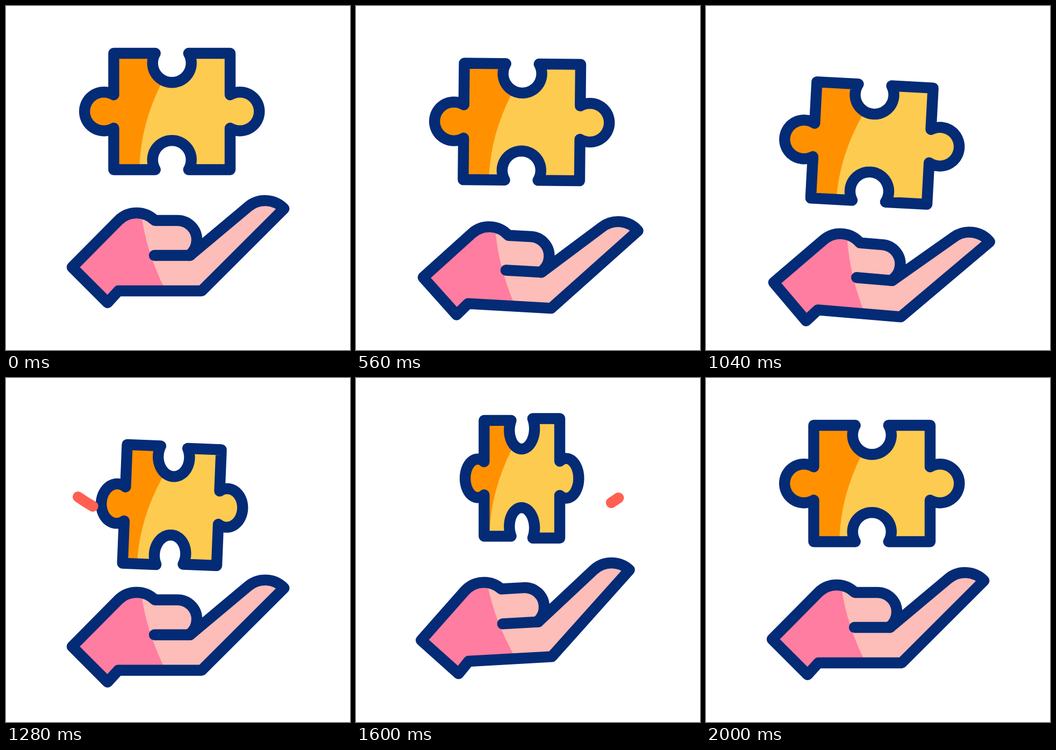
Write an HTML page with a canvas that moves like this. It is 640 by 640 pixels and loops after 2240 ms.

```html
<!DOCTYPE html>
<html lang="en">
<head>
<meta charset="utf-8">
<title>Puzzle in hand</title>
<style>
  html, body { margin: 0; width: 100%; height: 100%; overflow: hidden; background: #fff; }
  canvas { display: block; width: 100vw; height: 100vh; }
</style>
</head>
<body>
<canvas id="stage"></canvas>
<script>
const SIZE = 640, LOOP = 2240, STEP = 40;
const NAVY = '#042b76', ORANGE = '#ff9100', YELLOW = '#fdcb50';
const PINK = '#ff7da0', SKIN = '#fdbdb8', RED = '#ff6052';
const RAD = Math.PI / 180;

const canvas = document.getElementById('stage');
const ctx = canvas.getContext('2d');
const ratio = window.devicePixelRatio || 1;
canvas.width = canvas.height = SIZE * ratio;

const clamp = (x, lo, hi) => Math.min(hi, Math.max(lo, x));

// Cubic ease with horizontal handles of length u (start) and 1 - v (end).
function ease(p, u = 1 / 3, v = 2 / 3) {
  let lo = 0, hi = 1;
  for (let i = 0; i < 24; i++) {
    const s = (lo + hi) / 2, r = 1 - s;
    if (3 * r * r * s * u + 3 * r * s * s * v + s * s * s < p) lo = s; else hi = s;
  }
  return lo * lo * (3 - 2 * lo);
}

// Each segment: start time, end time, end value, handles.
function track(t, segments) {
  let value = 0;
  for (const [from, to, end, u, v] of segments) {
    if (t <= from) break;
    value += (end - value) * ease(clamp((t - from) / (to - from), 0, 1), u, v);
  }
  return value;
}

const DROP = [0.59, 0.25], RISE = [0.58, 0.56];
const motion = {
  handY: [[240, 880, 31.3, ...DROP], [1000, 1480, 0, ...RISE]],
  handTurn: [[240, 880, 4.85, ...DROP], [1000, 1480, -3.7, ...RISE], [1480, 2000, 0]],
  pieceY: [[320, 960, 58.8, 0.6, 0.2], [1080, 1560, -9.8, 0.6, 0.53], [1560, 2000, 0]],
  pieceTurn: [[360, 1000, 3.05, 0.6, 0.2], [1080, 1560, 0, 0.6, 0.53]],
  spin: [[1080, 2000, 180, 0.235, 0.516]],
  head: [[1240, 1460, 1]],
  tail: [[1320, 1640, 1]]
};

// Piece outline around its own centre.
const HALF = 108.25, LIP = 31, KNOB = 36;
function pieceOutline() {
  const points = [];
  const arc = (x, y, a, b) => {
    for (let i = 0; i <= 40; i++) {
      const angle = (a + (b - a) * i / 40) * RAD;
      points.push([x + KNOB * Math.cos(angle), y + KNOB * Math.sin(angle)]);
    }
  };
  const tilt = Math.asin(LIP / KNOB) / RAD;
  const gap = Math.sqrt(KNOB * KNOB - LIP * LIP);
  const notch = HALF - gap, bump = HALF + gap;
  points.push([-HALF, -HALF]);
  arc(0, -notch, 270 - tilt, 90 - 180 + tilt);
  points.push([HALF, -HALF]);
  arc(bump, 0, tilt - 360 + 180, 180 - tilt);
  points.push([HALF, HALF]);
  arc(0, notch, 90 - tilt, tilt - 270);
  points.push([-HALF, HALF]);
  arc(-bump, 0, tilt, 360 - tilt);
  return points;
}

function fixedOutline() {
  const all = pieceOutline();
  return all;
}
const outline = fixedOutline();

function ink() {
  ctx.strokeStyle = NAVY;
  ctx.lineWidth = 20.4;
  ctx.lineCap = ctx.lineJoin = 'round';
}

function fillSplit(shape, base, shade, edge) {
  ctx.save();
  ctx.clip(shape);
  ctx.fillStyle = base;
  ctx.fillRect(-SIZE, -SIZE, 3 * SIZE, 3 * SIZE);
  ctx.fillStyle = shade;
  ctx.fill(edge);
  ctx.restore();
}

const hand = new Path2D();
hand.moveTo(123, 486);
hand.arc(243, 433, 48, -135 * RAD, -45 * RAD);
hand.lineTo(319, 399);
hand.arc(319, 435, 36, -90 * RAD, 53.6 * RAD);
hand.lineTo(342.5, 464);
hand.arc(482, 411, 49, -130 * RAD, -44 * RAD);
hand.lineTo(364, 530);
hand.lineTo(209, 530);
hand.lineTo(189, 552);
hand.closePath();
const crease = new Path2D('M276 464H342.5');
const handShade = new Path2D('M251 370L252 390Q262 460 297 530L300 600H50V370Z');
const pieceShade = new Path2D('M3 -99L-21.7 -48.2Q-56.7 23.8 -60.2 97.8L-60.5 130H-220V-150H3Z');

function drawHand(t) {
  ctx.save();
  ctx.translate(156, 519 + track(t, motion.handY));
  ctx.rotate(track(t, motion.handTurn) * RAD);
  ctx.translate(-156, -519);
  fillSplit(hand, SKIN, PINK, handShade);
  ink();
  ctx.stroke(hand);
  ctx.stroke(crease);
  ctx.restore();
}

function drawPiece(t) {
  const angle = track(t, motion.spin) * RAD;
  const squash = Math.cos(angle), depth = Math.sin(angle);
  const near = 1 + 0.035 * depth, far = 1 - 0.006 * depth;
  const shape = new Path2D();
  for (const [x, y] of outline) {
    const side = (clamp(x / LIP, -1, 1) + 1) / 2;
    shape.lineTo(x * squash, y * (near + (far - near) * side));
  }
  shape.closePath();
  ctx.save();
  ctx.translate(308.7, 196.2 + track(t, motion.pieceY));
  ctx.rotate(track(t, motion.pieceTurn) * RAD);
  fillSplit(shape, YELLOW, ORANGE, pieceShade);
  ink();
  ctx.stroke(shape);
  ctx.restore();
}

function drawSwoosh(t) {
  const head = track(t, motion.head), tail = track(t, motion.tail);
  if (head <= tail) return;
  const at = k => (125.3 - 70 * k) * RAD;
  ctx.beginPath();
  ctx.arc(312.5, -31, 309, at(tail), at(head), true);
  ctx.strokeStyle = RED;
  ctx.lineWidth = 20;
  ctx.lineCap = 'round';
  ctx.stroke();
}

function draw(now) {
  const t = Math.floor((now % LOOP) / STEP) * STEP;
  ctx.setTransform(ratio, 0, 0, ratio, 0, 0);
  ctx.fillStyle = '#fff';
  ctx.fillRect(0, 0, SIZE, SIZE);
  drawHand(t);
  drawPiece(t);
  drawSwoosh(t);
}

let start;
function tick(now) {
  if (start === undefined) start = now;
  draw(Math.max(0, now - start));
  requestAnimationFrame(tick);
}
draw(0);
requestAnimationFrame(tick);
</script>
</body>
</html>
```
